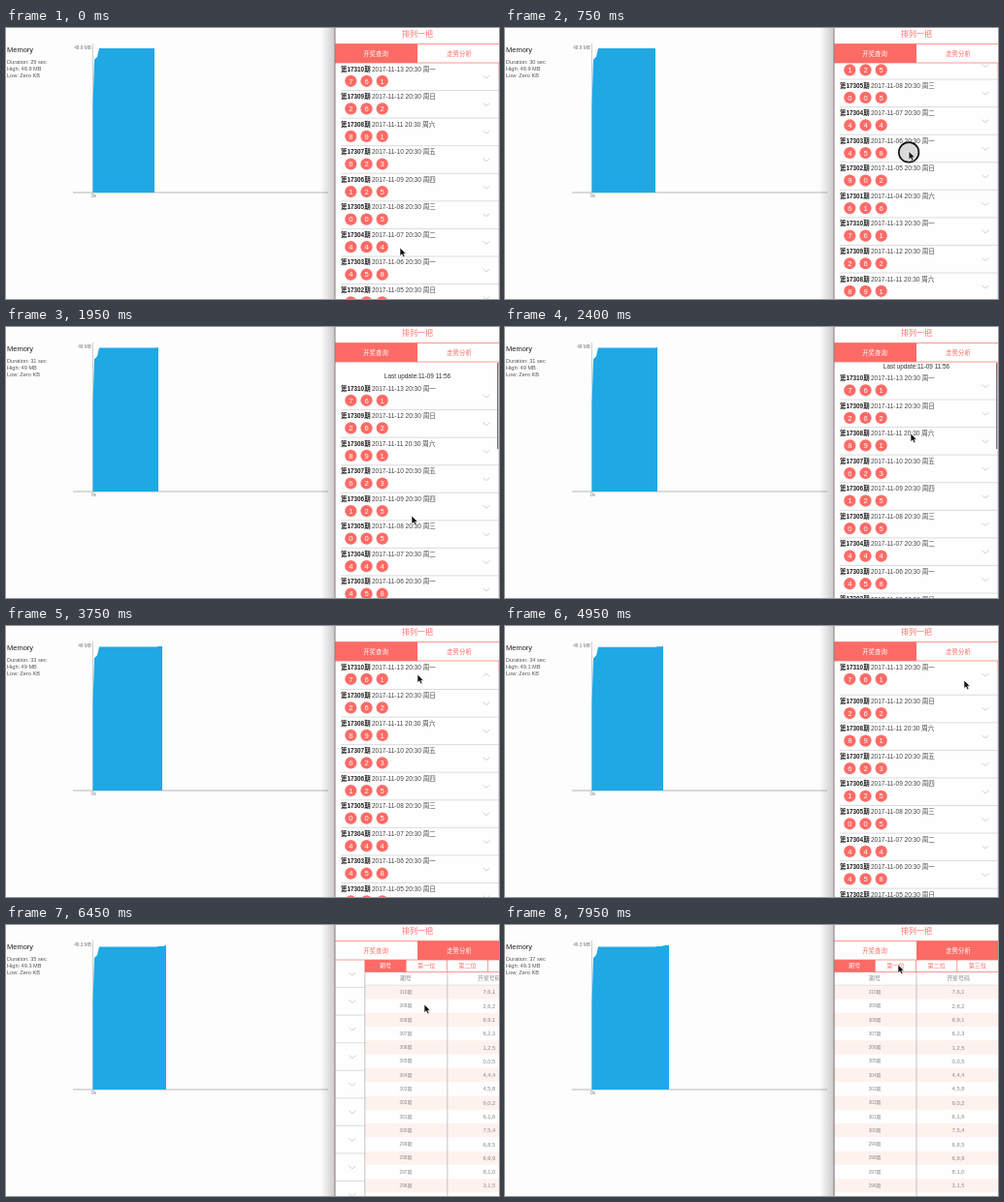
An HTML page that plays this animation: 508x280 px, repeating every 8 s.

```html
<!DOCTYPE html>
<html lang="en">
<head>
<meta charset="utf-8">
<title>Memory while scrolling</title>
<style>
html, body { margin: 0; height: 100%; overflow: hidden; background: #fdfdfd; }
svg { display: block; width: 100vw; height: 100vh; }
text { font-family: "Liberation Sans", "Noto Sans CJK SC", "Noto Sans CJK", sans-serif; white-space: pre; }
</style>
</head>
<body>
<svg id="stage" viewBox="0 0 508 280"></svg>
<script>
const LOOP = 8000, STEP = 150, ROW = 28.56, LEFT = 339, WIDTH = 169, RED = '#fc6b66';
const draws = '761 262 891 623 125 005 444 458 902 616 754 685 699 810 315'.split(' ');
const days = '一日六五四三二';

const text = (s, x, y, size, fill, anchor = 'start', extra = '') =>
  `<text x="${x}" y="${y + size * .36}" font-size="${size}" fill="${fill}" text-anchor="${anchor}" ${extra}>${s}</text>`;
const mid = (s, x, y, size, fill) => text(s, x, y, size, fill, 'middle');
const rect = (x, y, w, h, fill) => `<rect x="${x}" y="${y}" width="${w}" height="${h}" fill="${fill}"/>`;
const line = (x1, y1, x2, y2, color, w = .7) =>
  `<path d="M${x1} ${y1}L${x2} ${y2}" stroke="${color}" stroke-width="${w}"/>`;

// Smooth step from 0 to 1
function ramp(t, start, time) {
  const u = Math.min(1, Math.max(0, (t - start) / time));
  return u * u * (3 - 2 * u);
}

const scroll = t => 149 * ramp(t, 300, 600) - 170 * ramp(t, 1050, 900) + 21 * ramp(t, 2250, 300);
const gap = t => 28 * (ramp(t, 3705, 400) - ramp(t, 4650, 440));
const slide = t => WIDTH * ramp(t, 5850, 825);

// Pointer moves: start, time, dx, dy, dragging
const moves = [
  [300, 600, 12, -118, true],
  [1050, 900, 0, 86, true],
  [1950, 450, 0, -85],
  [2400, 900, 6, -60],
  [3900, 700, 49, 6],
  [4950, 900, 0, 29],
  [5850, 600, -42, -3, true],
  [6600, 900, -26, -41],
];

const level = sec => 48.86 + .18 * (sec > 30) + .1 * (sec > 33) + .2 * (sec > 34);

function memory(t) {
  const sec = Math.floor(29.35 + t / 1000), top = level(sec);
  const high = +top.toFixed(1) + ' MB';
  const y = v => 170 - 149 * v / top;
  let d = `M89.5 170V80L91 ${y(45)}L94 ${y(46)}L96 ${y(level(0))}`;
  for (let s = 29; s <= sec; s++) d += `L${153 + (s - 29) * 2} ${y(level(s))}`;
  return line(89.5, 16, 89.5, 170, '#bbb')
    + line(69, 170, 332, 170, '#999')
    + `<path d="${d}V170Z" fill="#20a8e4"/>`
    + text('Memory', 1, 22, 7.5, '#222')
    + [`Duration: ${sec} sec`, `High: ${high}`, 'Low: Zero KB']
      .map((s, i) => text(s, 1, 35 + i * 6.8, 5.6, '#555')).join('')
    + text(high, 88, 20.5, 4.8, '#777', 'end')
    + mid('0s', 90.5, 173, 4.8, '#777');
}

function list(t) {
  const top = 36 - scroll(t), shift = gap(t);
  let out = mid('Last update:11-09 11:56', 424, top - 6, 6.4, '#333');
  for (let k = 0; k < 23; k++) {
    const n = k % 10, y = top + k * ROW + (k ? shift : 0);
    if (k) out += line(345, y, 508, y, '#c4c4c4', .6);
    const date = `2017-11-${String(13 - n).padStart(2, '0')} 20:30 周${days[n % 7]}`;
    out += text(`第${17310 - n}期`, 345, y + 6.2, 6.4, '#222', 'start', 'font-weight="bold"')
      + text(date, 377, y + 6.2, 6.5, '#444');
    [...draws[n]].forEach((c, i) => {
      const x = 355.3 + i * 16.2;
      out += `<circle cx="${x}" cy="${y + 18.8}" r="6.1" fill="${RED}"/>` + mid(c, x, y + 18.8, 7.6, '#fff');
    });
    const dy = !k && t > 3600 && t < 4800 ? -3 : 3;
    out += `<path d="M491.5 ${y + 14.5 - dy / 2}l3.5 ${dy}l3.5 ${-dy}" fill="none" stroke="#c4c4c4" stroke-width=".8"/>`;
  }
  if (t >= 1650 && t < 2700) out += rect(506, 37, 1.4, 89, '#777');
  return out;
}

function trend() {
  const cell = WIDTH / 4;
  let out = rect(LEFT, 36, WIDTH, 244, '#fefefe') + rect(LEFT, 36, cell, 12.5, RED);
  ['期号', '第一位', '第二位', '第三位'].forEach((s, i) => {
    const x = LEFT + i * cell;
    out += mid(s, x + cell / 2, 42.2, 6.1, i ? RED : '#fff') + line(x, 36, x, 48.5, RED);
  });
  out += line(LEFT, 48.5, 508, 48.5, RED)
    + mid('期号', 381, 55.3, 5.9, '#888') + mid('开奖号码', 467, 55.3, 5.9, '#888');
  draws.forEach((d, k) => {
    const y = 62.2 + k * ROW / 2;
    if (k % 2 == 0) out += rect(LEFT, y, WIDTH, ROW / 2, '#fef2ef');
    out += mid(310 - k + '期', 381, y + 7.2, 4.7, '#888') + mid([...d].join(), 467, y + 7.2, 5.8, '#888');
  });
  return out + line(LEFT, 62.2, 508, 62.2, '#ccc', .5)
    + line(424, 48.5, 424, 280, '#aaa') + line(LEFT, 48.5, LEFT, 280, '#aaa');
}

function phone(t) {
  const dx = slide(t), active = t < 6150 ? 0 : 1;
  let out = rect(LEFT, 0, WIDTH, 280, '#fefefe')
    + `<g clip-path="url(#pages)"><g transform="translate(${-dx})">${list(t)}</g>`
    + `<g transform="translate(${WIDTH - dx})">${trend()}</g></g>`
    + mid('排列一把', 424, 6, 8, RED)
    + rect(LEFT + active * 85, 16.5, 85, 19.5, RED);
  ['开奖查询', '走势分析'].forEach((s, i) => out += mid(s, 381 + i * 86, 26.5, 6.4, i == active ? '#fff' : RED));
  return out + line(LEFT, 16.5, 508, 16.5, RED) + line(LEFT, 36, 508, 36, RED)
    + rect(324, 0, 15, 280, 'url(#shade)') + line(LEFT, 0, LEFT, 280, '#8a7c7c', 1);
}

function cursor(t) {
  let x = 406, y = 228, held = false;
  for (const [start, time, dx, dy, drag] of moves) {
    const u = ramp(t, start, time);
    x += dx * u;
    y += dy * u;
    held ||= drag && t >= start && t < start + time;
  }
  return `<g transform="translate(${x} ${y})">`
    + (held ? '<circle r="10.3" fill="#888" fill-opacity=".3" stroke="#111" stroke-width="1.6"/>' : '')
    + '<path d="M0 -1V7.6L2 5.8L3.4 8.8L5 8.1L3.7 5.2H6.3Z" fill="#111" stroke="#fff" stroke-width=".6"/></g>';
}

const defs = `<defs><clipPath id="pages">${rect(LEFT, 36, WIDTH, 244, '#000')}</clipPath>
  <linearGradient id="shade"><stop stop-opacity="0"/><stop offset="1" stop-opacity=".2"/></linearGradient></defs>`;
const stage = document.getElementById('stage');
let shown = -1;

function frame() {
  const t = Math.floor(performance.now() % LOOP / STEP) * STEP;
  if (t != shown) {
    shown = t;
    stage.innerHTML = defs + rect(0, 0, 508, 280, '#fdfdfd') + memory(t) + phone(t) + cursor(t);
  }
  requestAnimationFrame(frame);
}
frame();
</script>
</body>
</html>
```
